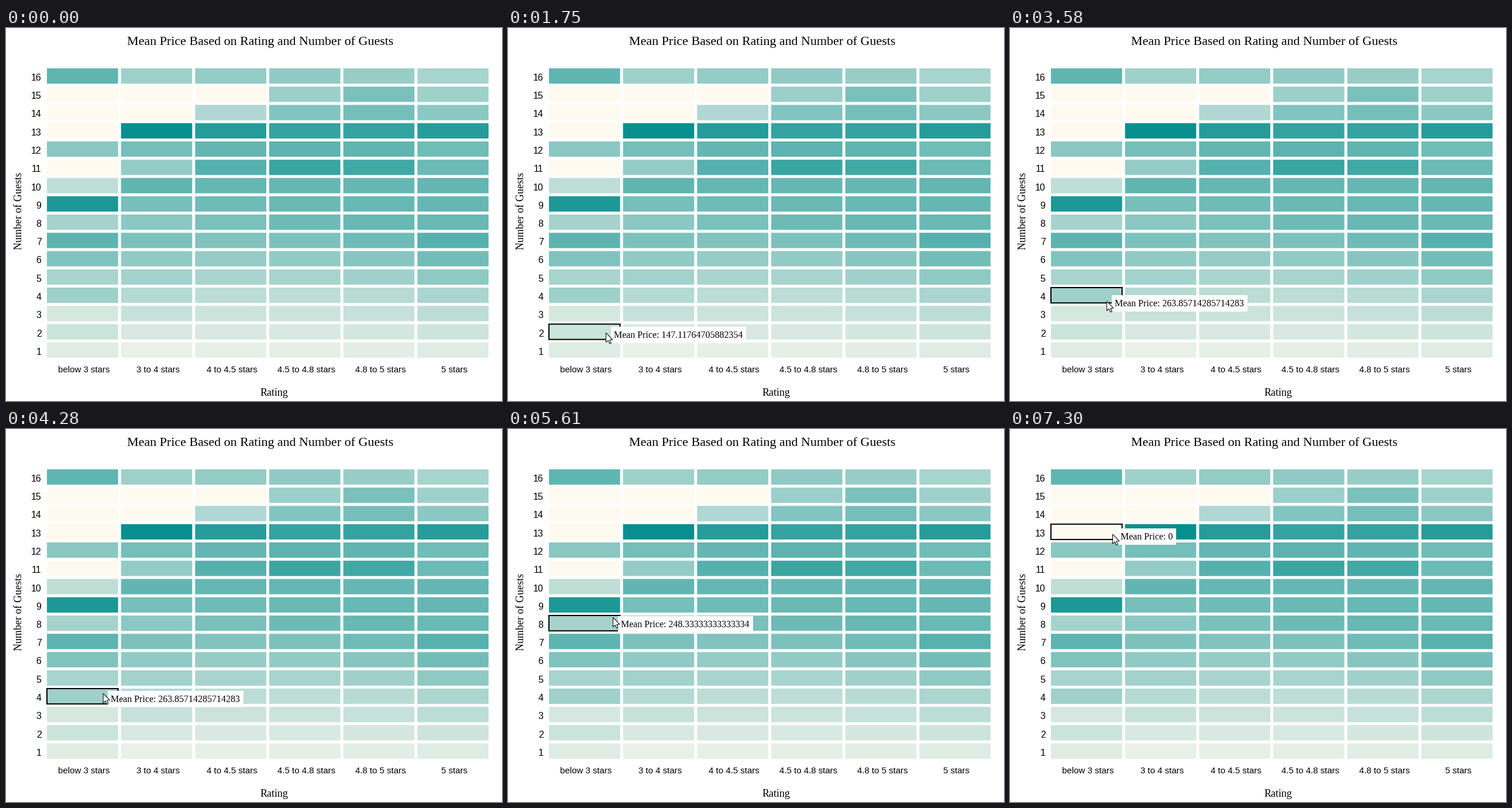
Write a matplotlib script that moves like this. It is 848 px wide and 638 px high and loops after 8000 ms.

```python
import numpy as np
import matplotlib.pyplot as plt
from matplotlib.animation import FuncAnimation
from matplotlib.collections import PatchCollection
from matplotlib.patches import Polygon, Rectangle

W, H, DPI = 848, 638, 64
STEP_MS, LOOP_MS = 50, 8000
PT = 72 / DPI  # points per pixel

SERIF, SANS = "Liberation Serif", "Liberation Sans"
LOW = np.array([255, 250, 240]) / 255
HIGH = np.array([0, 139, 139]) / 255

# Grid of bands, each cell leaving a gap at its right and bottom
X0, Y0, GAP = 70, 69, 5
DX, DY = 760 / 6, 500 / 16
CELL_W, CELL_H = DX - GAP, DY - GAP

RATINGS = ["below 3 stars", "3 to 4 stars", "4 to 4.5 stars",
           "4.5 to 4.8 stars", "4.8 to 5 stars", "5 stars"]

# Mean prices of the lowest rating, from 16 guests down to 1
PRICES = ["436.5", "0", "0", "0", "323", "0", "179.5", "624",
          "248.33333333333334", "443.14285714285717", "351.42857142857144",
          "241.33333333333334", "263.85714285714283", "116.5",
          "147.11764705882354", "88"]
TOP_PRICE = 704

# Price level (% of top) at the second, fourth and sixth rating, by guests
LEVELS = {1: (9, 10, 13), 4: (29, 26, 33), 7: (51, 51, 66), 8: (45, 57, 59),
          10: (62, 60, 61), 11: (42, 77, 58), 12: (54, 64, 56),
          13: (97, 79, 85), 14: (0, 49, 45), 15: (-70, 39, 38),
          16: (38, 43, 34)}

# Pointer: first place, then eased shifts (from ms, to ms, dx, dy)
START, SHOW_MS = (327, 597), 430
SHIFTS = [(430, 850, -159, -41), (1300, 1700, -1, -35), (2380, 2700, -1, -31),
          (3180, 3400, -1, -23), (3550, 3600, 0, -2), (3850, 3900, 0, -2),
          (4100, 4530, 2, -40), (4900, 5100, 6, 0), (4960, 5800, 7, -118),
          (6670, 7250, -5, -125.4)]
ARROW = np.array([(0, 0), (0, 16.2), (3.8, 12.8), (6.3, 18.5),
                  (8.8, 17.4), (6.4, 11.9), (11.4, 11.6)])


def price_share(row, col):
    """Price as a share of the top price; a parabola runs over the ratings."""
    if col == 0:
        return float(PRICES[row]) / TOP_PRICE
    guests = 16 - row
    low, mid, high = (np.interp(guests, list(LEVELS), curve)
                      for curve in zip(*LEVELS.values()))
    u = (col - 3) / 2
    level = mid + (high - low) / 2 * u + ((low + high) / 2 - mid) * u * u
    return np.clip(level / 100, 0, 1)


def pointer_at(ms):
    place = np.array(START, float)
    for begin, end, dx, dy in SHIFTS:
        u = np.clip((ms - begin) / (end - begin), 0, 1)
        place += np.multiply((dx, dy), u * u * (3 - 2 * u))
    return place


def hovered_row(x, y):
    """Row under the point in the first column, or None in a gap."""
    row, inside = divmod(y - Y0, DY)
    if X0 <= x <= X0 + CELL_W and 0 <= row < 16 and inside <= CELL_H:
        return int(row)
    return None


fig = plt.figure(figsize=(W / DPI, H / DPI), dpi=DPI, facecolor="white")
ax = fig.add_axes([0, 0, 1, 1])
ax.set_xlim(0, W)
ax.set_ylim(H, 0)
ax.axis("off")


def label(x, y, text, family, px, ha="center", **kw):
    return ax.text(x, y, text, family=family, fontsize=px * PT, ha=ha,
                   va="baseline", color="black", **kw)


cells, fills = [], []
for r in range(16):
    for c in range(6):
        cells.append(Rectangle((X0 + c * DX, Y0 + r * DY), CELL_W, CELL_H))
        fills.append(LOW + (HIGH - LOW) * price_share(r, c))
ax.add_collection(PatchCollection(cells, facecolors=fills, linewidths=0,
                                  snap=False), autolim=False)

label(434.5, 29, "Mean Price Based on Rating and Number of Guests", SERIF, 22)
label(458.5, 629, "Rating", SERIF, 18)
label(27, 313, "Number of Guests", SERIF, 18, rotation=90,
      rotation_mode="anchor")
for c, name in enumerate(RATINGS):
    label(X0 + (c + 0.5) * DX, 589, name, SANS, 15)
for r in range(16):
    label(60.6, 90 + r * DY, str(16 - r), SANS, 16, ha="right")

outline = ax.add_patch(Rectangle((X0, Y0), CELL_W, CELL_H, fill=False,
                                 ec="black", lw=2 * PT, snap=False, zorder=4))
tip_box = ax.add_patch(Rectangle((0, 0), 1, 28, fc="white", lw=0, zorder=5))
tip_text = label(0, 0, "", SERIF, 16, ha="left", zorder=6)
arrow = ax.add_patch(Polygon(ARROW, fc="white", ec="black", lw=PT, zorder=7))


def update(i):
    ms = i * STEP_MS
    arrow.set_visible(ms >= SHOW_MS)
    arrow.set_xy(ARROW + pointer_at(ms) + 0.5)

    # The page reacts one step behind the pointer
    x, y = pointer_at(ms - STEP_MS)
    row = hovered_row(x, y)
    for part in (outline, tip_box, tip_text):
        part.set_visible(row is not None)
    if row is not None:
        outline.set_y(Y0 + row * DY)
        left, top = round(x + 9), round(y - 10)
        tip_text.set_text("Mean Price: " + PRICES[row])
        tip_text.set_position((left + 5, top + 19))
        tip_box.set_xy((left, top))
        tip_box.set_width(tip_text.get_window_extent().width + 11)
    return outline, tip_box, tip_text, arrow


anim = FuncAnimation(fig, update, frames=LOOP_MS // STEP_MS,
                     interval=STEP_MS, repeat=True, repeat_delay=0)
plt.show()
```
